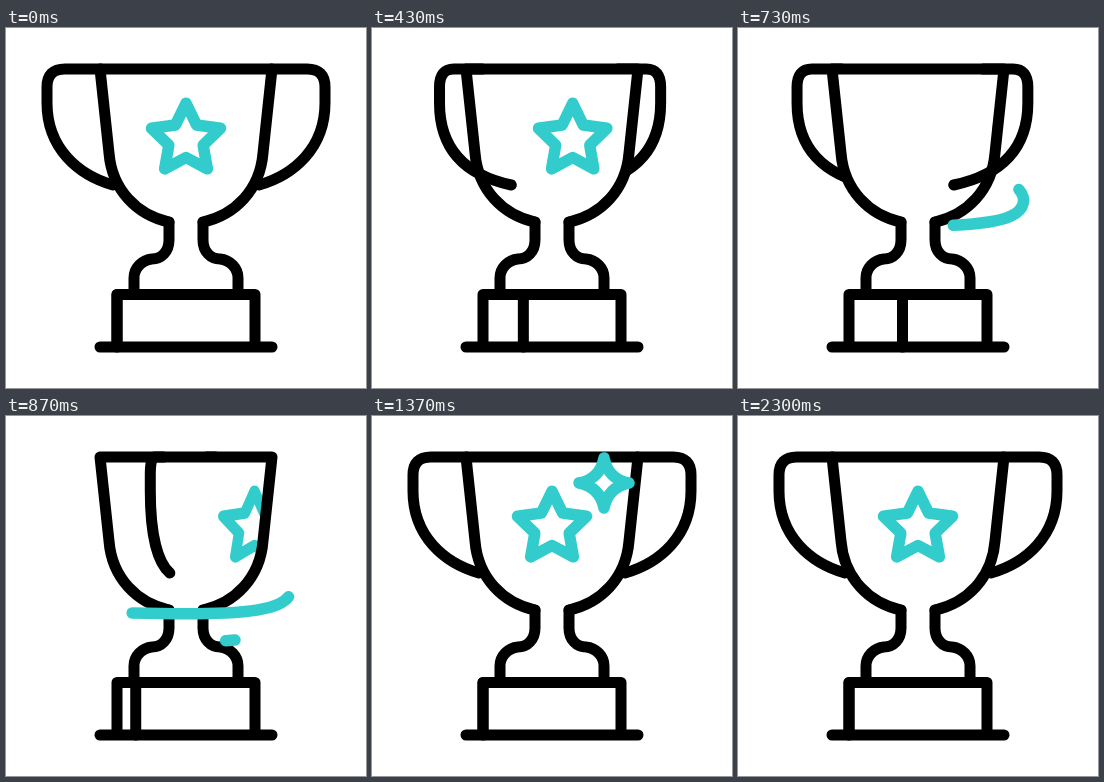
An HTML page for the animation above (2500 ms loop, 360 px wide and 360 px high).

```html
<!DOCTYPE html>
<html lang="en">
<head>
<meta charset="utf-8">
<title>Spinning trophy</title>
<style>
  html, body { margin: 0; height: 100%; overflow: hidden; background: #fff; }
  svg { display: block; width: 100vw; height: 100vh; fill: none; stroke: #000;
        stroke-width: 11; stroke-linecap: round; stroke-linejoin: round; }
  .teal { stroke: #33cccc; stroke-width: 11.5; }
</style>
</head>
<body>
<svg viewBox="0 0 360 360">
  <defs>
    <path id="cup" d="M94 41H266L257 125C254 162 229 187 197 194H163C131 187 106 162 103 125Z"/>
    <clipPath id="inside"><use href="#cup"/></clipPath>
  </defs>
  <g id="back"></g>
  <use href="#cup" fill="#fff" stroke="none"/>
  <g clip-path="url(#inside)"><path id="star" class="teal"/></g>
  <path d="M163 194C131 187 106 162 103 125L94 41H266L257 125C254 162 229 187 197 194"/>
  <g id="front"></g>
  <path d="M163 194V212C163 224 155 231 146 231C136 232 128 240 128 250V264
           M197 194V212C197 224 205 231 214 231C224 232 232 240 232 250V264
           M111 319V266.5H249V319M94 319H266"/>
  <path id="edge" d="M0 266.5V319"/>
  <path id="upper" class="teal" pathLength="100"
        d="M277 158C288 166 290 180 273 188C252 198 200 199 126 197C95 195 55 187 78 166"/>
  <path id="lower" class="teal" pathLength="100" d="M229 224C205 226 190 226 174 226C156 226 138 225 130 218"/>
  <path id="spark" class="teal" d="M0-25Q4-4 25 0Q4 4 0 25Q-4 4-25 0Q-4-4 0-25Z"/>
</svg>
<script>
const LOOP = 2500, TAU = Math.PI * 2;
const el = id => document.getElementById(id);
const SPIN_TIMES = [270, 430, 630, 870, 1000, 1370];

// Smooth monotone curve through the given times and values.
function track(times, values, t) {
  const last = times.length - 1;
  if (t <= times[0]) return values[0];
  if (t >= times[last]) return values[last];
  const slope = i => (values[i + 1] - values[i]) / (times[i + 1] - times[i]);
  const tangent = i => {
    if (i === 0 || i === last) return 0;
    const a = slope(i - 1), b = slope(i);
    return a * b > 0 ? 2 * a * b / (a + b) : 0;
  };
  const i = times.findIndex(x => x > t) - 1;
  const span = times[i + 1] - times[i], u = (t - times[i]) / span, v = 1 - u;
  return v * v * (1 + 2 * u) * values[i] + u * u * (3 - 2 * u) * values[i + 1]
    + span * u * v * (v * tangent(i) - u * tangent(i + 1));
}

const spin = (t, ...turns) => track(SPIN_TIMES, [0, ...turns, 3, 4], t);

function drawHandles(t) {
  const angle = TAU * spin(t, .1025, .891, 2.204);
  const c = Math.cos(angle), s = Math.sin(angle), twist = Math.sin(2 * angle);
  const mid = 180 - 4 * Math.abs(twist) + 2 * twist;
  const foot = 73 * c * (1 - Math.abs(c) * (.39 * Math.abs(s) + .3 * s));
  const handle = side => {
    const x = d => mid + side * d * c;
    return `<path d="M${x(85)} 41L${x(121)} 41Q${x(139)} 41 ${x(139)} 59V75` +
      `C${x(139)} 120 ${x(108)} 147 ${mid + side * foot} 157"/>`;
  };
  const near = s > 0 ? -1 : 1, turning = Math.abs(s) > 1e-4;
  el('back').innerHTML = handle(-near) + (turning ? '' : handle(near));
  el('front').innerHTML = turning ? handle(near) : '';
}

function drawStar(t) {
  const pos = spin(t, .093, .924, 2.306);
  const dx = (pos - Math.round(pos)) * 220;
  el('star').setAttribute('transform', `translate(${180 + dx} 111.5) scale(${1 - dx * dx * 2e-5} 1)`);
}

function drawEdge(t) {
  const pos = spin(t, .29, .94, 2.13);
  el('edge').setAttribute('transform', `translate(${111 + 138 * (pos % 1)} 0)`);
}

function trim(id, from, to) {
  const path = el(id), shown = to - from > .2;
  path.style.display = shown ? '' : 'none';
  path.setAttribute('stroke-dasharray', `${Math.max(to - from, 0)} 300`);
  path.setAttribute('stroke-dashoffset', -from);
}

function draw(t) {
  drawHandles(t);
  drawStar(t);
  drawEdge(t);
  trim('upper',
    track([630, 870, 1000, 1130], [0, 10, 54.7, 100], t),
    track([560, 630, 870, 1000], [0, 13.7, 71, 100], t));
  trim('lower',
    track([1000, 1230], [0, 100], t),
    track([840, 870, 1000, 1130], [0, 9, 54, 100], t));
  const size = track([1170, 1370, 2100, 2300], [0, 1, 1, 0], t);
  el('spark').style.display = size > .01 ? '' : 'none';
  el('spark').setAttribute('transform', `translate(232 67) scale(${size})`);
}

const points = Array.from({ length: 10 }, (_, i) => {
  const r = i % 2 ? 18 : 36.3, a = TAU * (i / 10 - .25);
  return `${r * Math.cos(a)} ${r * Math.sin(a)}`;
});
el('star').setAttribute('d', `M${points.join('L')}Z`);

const start = performance.now();
function frame() {
  draw((performance.now() - start) % LOOP);
  requestAnimationFrame(frame);
}
frame();
</script>
</body>
</html>
```
